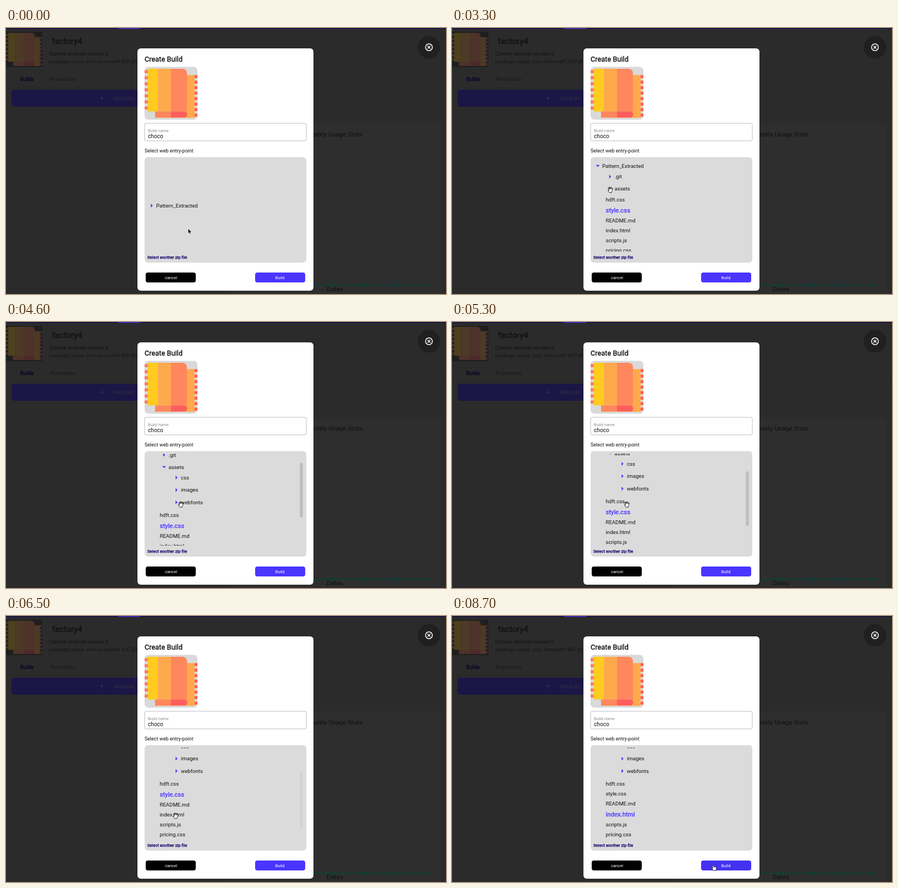
An HTML page that plays this animation: 800x483 px, repeating every 8.8 s.

```html
<!DOCTYPE html>
<html lang="en">
<head>
<meta charset="utf-8">
<title>Create Build</title>
<style>
  html, body { margin: 0; width: 100%; height: 100%; overflow: hidden; background: #2b2b2c; }
  svg { display: block; width: 800px; height: 483px; }
  text { font: 9.6px Roboto, sans-serif; fill: currentColor; color: #111; }
  .bold { stroke: currentColor; stroke-width: .35px; }
  .dim { color: #171717; }
  .white { color: #fff; }
  .navy { color: #160a6c; }
  .accent { color: #4a35ff; }
</style>
</head>
<body>
<svg viewBox="0 0 800 483">
  <defs>
    <clipPath id="treeClip"><rect x="252" y="239" width="294" height="167"/></clipPath>
    <g id="rug">
      <g id="fringe"></g>
      <path fill="#ffa94d" d="M76 15H91V92.500H19V81H76z"/>
      <path fill="#ffcb1f" d="M6 3.500H24V81H6z"/>
      <path fill="#ffa94d" d="M24 3.500H48V81H24z"/>
      <path fill="#ff875d" d="M48 3.500H69a8 8 0 0 1 8 8V81H48z"/>
      <path fill="#ff875d" d="M19 81H48V92H19z"/>
      <path fill="#ff5d5d" d="M48 81H72a5.500 5.500 0 0 1 0 11H48z"/>
    </g>
  </defs>

  <!-- Dimmed page -->
  <rect width="800" height="483" fill="#2b2b2c"/>
  <rect width="800" height="1.300" fill="#110b46"/>
  <rect x="204" width="40" height="1.500" fill="#4030d8"/>
  <use href="#rug" transform="translate(0 6.500) scale(.677)"/>
  <rect y="7" width="66" height="64" fill="#1c1c1c" opacity=".78"/>
  <g id="page">
    <rect y="108" width="800" height=".600" fill="#262626"/>
    <rect x="10" y="112" width="386" height="31" rx="5" fill="#1b1645"/>
    <path d="M170.500 127.500h8M174.500 123.500v8" stroke="#34323f" stroke-width="1.200"/>
    <rect x="405" y="173" width="386" height="320" rx="5" fill="#2e2e2f"/>
    <path d="M430 467H766" stroke="#0d3f34" stroke-width="2"/>
    <g fill="#0d3f34">
      <circle cx="598" cy="467" r="3"/><circle cx="654" cy="467" r="3"/>
      <circle cx="710" cy="467" r="3"/><circle cx="766" cy="467" r="3"/>
    </g>
    <circle cx="769" cy="35" r="20.500" fill="#202021"/>
    <g fill="none" stroke="#fff" stroke-width="1.500">
      <circle cx="769" cy="35" r="6.200"/>
      <path d="M766.500 32.500l5 5m0-5l-5 5"/>
    </g>
  </g>

  <!-- Dialog -->
  <g id="dialog">
    <rect x="239" y="37" width="320" height="440" rx="6" fill="#fff"/>
    <rect x="252" y="70.500" width="96" height="96" rx="7" fill="#d9d9da"/>
    <use href="#rug" x="252" y="70.500"/>
    <rect x="252" y="173" width="294" height="32" rx="3" fill="#fff" stroke="#bdb9c4"/>
    <rect x="252" y="234.500" width="294" height="191.500" rx="6" fill="#dbdbdc"/>
    <rect x="254" y="444" width="91" height="18" rx="4" fill="#000"/>
    <rect id="buildButton" x="453" y="444" width="91" height="18" rx="4"/>
  </g>
  <g id="tree" clip-path="url(#treeClip)"></g>
  <rect id="thumb" x="534.500" width="5" height="99" rx="2" fill="#bcbcbd"/>
  <path id="cursor" stroke-width=".900" stroke-linejoin="round"/>
</svg>

<script>
const LOOP = 8800;
const $ = id => document.getElementById(id);

function add(parent, tag, attributes, content = '') {
  const node = document.createElementNS('http://www.w3.org/2000/svg', tag);
  for (const key in attributes) node.setAttribute(key, attributes[key]);
  node.textContent = content;
  return parent.appendChild(node);
}

// y is the vertical centre of the line.
const label = (parent, content, x, y, size = 9.6, cls = '', anchor = 'start') =>
  add(parent, 'text', { x, y, dy: '.35em', class: cls, 'text-anchor': anchor, style: `font-size:${size}px` }, content);

for (let i = 0; i < 7; i++) add($('fringe'), 'rect', { x: 0, y: 6 + 11 * i, width: 6, height: 5.5, fill: '#ff7a5d' });
for (let i = 0; i < 8; i++) add($('fringe'), 'rect', { x: 91, y: 15 + 10 * i, width: 5, height: 5.5, fill: '#ff5d5d' });

const page = $('page'), dialog = $('dialog');
label(page, 'factory4', 83.5, 24, 15, 'bold');
label(page, 'Current android version 0', 78.5, 47);
label(page, 'package name: com.lumoweft.K47qRx', 78.5, 61, 9.6, 'dim');
label(page, 'Builds', 26, 92.5, 9, 'bold').style.color = '#080426';
label(page, 'Promotions', 79.5, 92.5, 9, 'dim');
label(page, 'Add build', 195, 127.5, 9).style.color = '#34323f';
label(page, 'Weekly Usage Stats', 648, 192.5, 11.5, '', 'end');
label(page, 'Dates', 598, 474, 11.6, '', 'middle');

label(dialog, 'Create Build', 252, 57, 12.8, 'bold');
label(dialog, 'Build name', 258, 186, 7.6).style.color = '#8d8d8d';
label(dialog, 'choco', 258, 196, 10.2);
label(dialog, 'Select web entry-point', 252, 223, 9);
label(dialog, 'Select another zip file', 257, 416.5, 7.6, 'bold navy');
label(dialog, 'cancel', 300, 453, 7.6, 'white', 'middle');
label(dialog, 'Build', 498, 453, 7.6, 'white', 'middle');

const row = (name, x, folder) => ({
  text: label($('tree'), name, x, 0),
  arrow: folder && add($('tree'), 'path', { fill: '#4a35ff' }),
  x
});
const root = row('Pattern_Extracted', 273, true);
const git = row('.git', 295.5, true);
const assets = row('assets', 295.5, true);
const subfolders = ['css', 'images', 'webfonts'].map(name => row(name, 318, true));
const files = ['hdft.css', 'style.css', 'README.md', 'index.html', 'scripts.js', 'pricing.css']
  .map(name => row(name, 279.5, false));
const allRows = [root, git, assets, ...subfolders, ...files];

function place({ text, arrow, x }, y, open = false) {
  text.setAttribute('y', y);
  text.style.display = '';
  if (!arrow) return;
  arrow.style.display = '';
  arrow.setAttribute('d', open
    ? `M${x - 11.5} ${y - 1.7}h7l-3.500 3.500z`
    : `M${x - 9.7} ${y - 3.5}v7l3.500-3.500z`);
}

function drawTree(t, scroll) {
  for (const { text, arrow } of allRows) {
    text.style.display = 'none';
    if (arrow) arrow.style.display = 'none';
  }
  if (t < 2100) return place(root, 322.5);

  const assetsOpen = t >= 3450;
  place(root, 250.5 - scroll, true);
  place(git, 269.7 - scroll);
  place(assets, 292 - scroll, assetsOpen);
  if (assetsOpen) subfolders.forEach((item, i) => place(item, 311 + 22.5 * i - scroll));

  const selected = t < 6700 ? 1 : 3;
  let top = (assetsOpen ? 370.4 : 303) - scroll;
  files.forEach((file, i) => {
    const active = i === selected, height = active ? 19.4 : 18;
    place(file, top + height / 2);
    file.text.style.fontSize = active ? '11.4px' : '9.6px';
    file.text.setAttribute('class', active ? 'bold accent' : '');
    top += height;
  });
}

const smooth = p => p * p * (3 - 2 * p);
const linear = p => p;

// Keys are [time, ...values].
function follow(keys, t, ease) {
  const next = keys.findIndex(key => key[0] > t);
  if (next < 0) return keys.at(-1).slice(1);
  const from = keys[next - 1], to = keys[next];
  const p = ease((t - from[0]) / (to[0] - from[0]));
  return from.slice(1).map((value, i) => value + (to[i + 1] - value) * p);
}

const pointerPath = [
  [0, 331, 364], [200, 331, 364], [900, 265, 319], [2200, 265, 319],
  [3000, 288.5, 294], [3600, 288.5, 294], [4100, 318.5, 331.5], [5700, 318.5, 331.5],
  [6300, 309, 363], [6800, 309, 363], [7700, 477, 457]
];
const scrollPath = [[0, 0], [4000, 0], [4600, 28.5], [5300, 53.5], [5700, 74.5]];
const thumbFade = [[0, 0], [3950, 0], [4100, 1], [6250, 1], [6600, 0]];

const cursors = {
  arrow: 'M0 0V9.500L2.200 7.500 3.700 10.800 5.400 10 4 6.900H7z',
  hand: 'M-2.500 4.800L-4.700 1.200q-.6-1.500.8-1.200l1.100.9-1.500-4q0-1.300 1.200-.8l1 2.300-.3-3.300q.7-1 1.500 0l.4 3 .8-2.700q.9-.8 1.400.1l-.2 3.100.9-1.600q1-.5 1.200.4l-.8 4-1 2v1.400z',
  finger: 'M-3.600-4.200q.9-1 1.700.2l1.100 2.600q1-.6 1.500.1 1-.5 1.500.2 1.300-.3 1.500.8l.2 2.200-.9 2v1.300h-4.500l-2.600-3.200q-.8-1.300.3-1.400l1 .5z'
};

function cursorKind(t) {
  if (t >= 7600) return 'finger';
  return t >= 800 && t < 6950 ? 'hand' : 'arrow';
}

function draw(t) {
  const [scroll] = follow(scrollPath, t, linear);
  drawTree(t, scroll);
  $('thumb').setAttribute('y', 239 + scroll * .6);
  $('thumb').setAttribute('opacity', follow(thumbFade, t, linear)[0]);
  $('buildButton').setAttribute('fill', t >= 7600 ? '#4431f0' : '#4a35ff');

  const kind = cursorKind(t), cursor = $('cursor');
  cursor.setAttribute('d', cursors[kind]);
  cursor.setAttribute('fill', kind === 'arrow' ? '#000' : '#fff');
  cursor.setAttribute('stroke', kind === 'arrow' ? '#fff' : '#111');
  cursor.setAttribute('transform', `translate(${follow(pointerPath, t, smooth)})`);
}

const start = performance.now();
function tick() {
  draw((performance.now() - start) % LOOP);
  requestAnimationFrame(tick);
}
tick();
</script>
</body>
</html>
```
